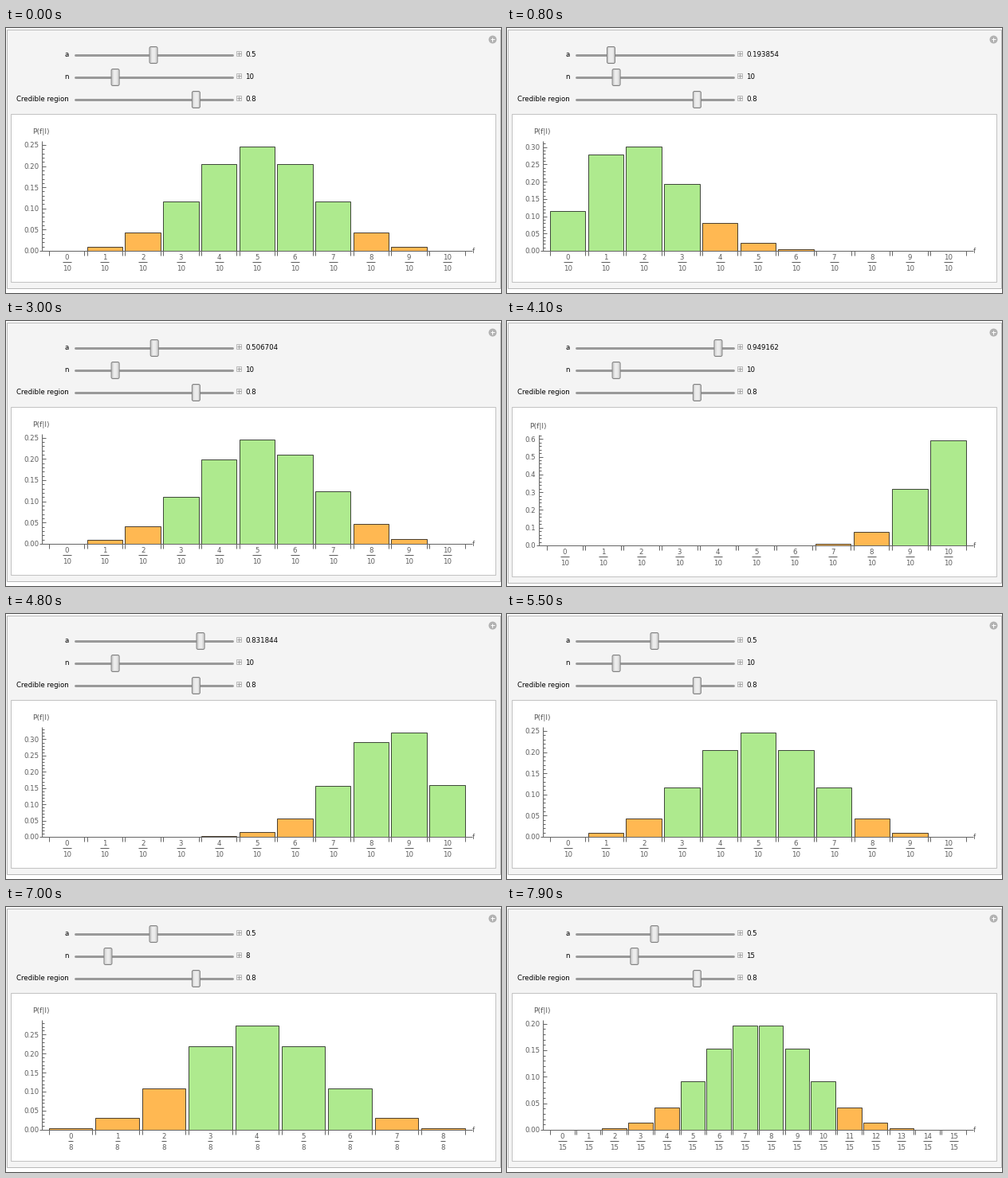
A matplotlib script that plays this animation: 621 px wide and 333 px high, repeating every 8 s.

```python
import math

import matplotlib.pyplot as plt
import numpy as np
from matplotlib.animation import FuncAnimation
from matplotlib.patches import Circle, FancyBboxPatch, Rectangle

W, H = 621, 333
STEP_MS, FRAMES = 100, 80
GREEN, ORANGE = "#aeea8e", "#ffb852"
EDGE = (0, 0, 0, 0.7)
AXIS, TEXT = "#666666", "#5c5c5c"
CREDIBLE = 0.8

# Slider drags as (time in ms, value)
A_KEYS = [(0, .5), (200, .465), (900, .15), (1000, .11), (1100, .11),
          (1300, .04), (1400, .05), (1600, .143575), (2100, .4), (2200, .4),
          (2600, .506704), (3100, .506704), (3800, .85), (4100, .949162),
          (4300, .988), (4400, .988), (4600, .94), (5300, .57), (5500, .5)]
N_KEYS = [(6000, 10), (6400, 3), (6500, 2), (6600, 3), (7200, 10),
          (7600, 10), (7900, 15)]

plt.rcParams["font.family"] = "DejaVu Sans"
plt.rcParams["lines.solid_capstyle"] = "butt"
fig = plt.figure(figsize=(W / 72, H / 72), dpi=72, facecolor="white")
ax = fig.add_axes([0, 0, 1, 1])


def value_at(keys, t):
    times, values = zip(*keys)
    return float(np.interp(t, times, values))


def slider_a(t):
    """Dragging moves the value in steps of one pixel of the track."""
    if t == 0 or t >= 5500:
        return 0.5
    anchor = 0.5067036 if t <= 3100 else 0.949162
    steps = round((value_at(A_KEYS, t) - anchor) * 179)
    return min(max(anchor + steps / 179, 0), 1)


# One-pixel strokes snap to pixel centres, so whole coordinates name pixels.
def line(x0, y0, x1, y1, color=AXIS, lw=1, **kw):
    ax.plot([x0, x1], [y0, y1], color=color, lw=lw, **kw)


def rect(x, y, w, h, face, edge, **kw):
    ax.add_patch(Rectangle((x, y), w, h, fc=face, ec=edge, lw=1, **kw))


def label(x, y, s, size=8.6, color=TEXT, ha="center"):
    ax.text(x, y, s, fontsize=size, color=color, ha=ha, va="baseline")


def draw_slider(y, name, pos, text):
    label(79, y + 2, name, 8.65, "black", "right")
    line(87, y, 284, y, "#999999", 3, solid_capstyle="round")
    x = 96 + 178 * pos
    ax.add_patch(FancyBboxPatch((x - 5, y - 10.5), 10, 21, fc="#cfcfcf",
                                ec="#828282", lw=1, zorder=3,
                                boxstyle="round,pad=0,rounding_size=2"))
    for half, shade in ((3.5, "#dcdcdc"), (2.2, "#ececec")):
        ax.add_patch(Rectangle((x - half, y - 9), 2 * half, 18, fc=shade,
                               lw=0, zorder=4))
    rect(289, y - 5, 6, 6, "#ececec", "#bcbcbc")
    line(290, y - 2, 295, y - 2, "#a4a4a4")
    line(292, y - 4, 292, y + 1, "#a4a4a4")
    label(300.3, y + 2, text, 8.65, "black", "left")


def credible_set(p):
    """Most probable outcomes, higher index first on ties."""
    chosen, mass = set(), 0
    for k in sorted(range(len(p)), key=lambda k: (-round(p[k], 9), -k)):
        if mass >= CREDIBLE:
            break
        chosen.add(k)
        mass += p[k]
    return chosen


def draw_chart(p, wide, step):
    n = len(p) - 1
    axis_x, left, base, height = ((45, 54, 280, 131) if wide
                                  else (40, 50, 282, 132.3))
    top, span = max(p), 575.6 - left
    scale = height / top
    gap = 0.0625 * span / n
    width = (span - n * gap) / (n + 1)
    green = credible_set(p)

    for k, prob in enumerate(p):
        x = left + k * (width + gap)
        if prob * scale > 0.6:
            rect(x, base - prob * scale, width, prob * scale,
                 GREEN if k in green else ORANGE, EDGE, zorder=2)
        for edge in (x, x + width):
            line(edge, base, edge, base + 6)
        mid = x + width / 2
        half = 5.5 if n >= 10 else 3
        label(mid, base + 11, str(k))
        line(mid - half, base + 14, mid + half, base + 14, TEXT)
        label(mid, base + 25, str(n))

    line(axis_x - 3, base, 585, base, zorder=3)
    label(586.7, base + 3, "f")
    line(axis_x, base, axis_x, base - 1.05 * height)
    label(axis_x - 1, base - 147, "P(f|I)", 9.3)

    parts = 4 if step == 0.2 else 5
    for i in range(int(1.05 * top / step * parts + 1e-6) + 1):
        value = i * step / parts
        y = base - value * scale
        major = i % parts == 0
        line(axis_x, y, axis_x + (5 if major else 3), y)
        if major:
            label(axis_x - 3.7, y + 3.4, f"{value:.{2 if wide else 1}f}",
                  ha="right")


def draw(frame):
    t = frame * STEP_MS
    a = slider_a(t)
    n = round(value_at(N_KEYS, t))
    p = [math.comb(n, k) * a**k * (1 - a)**(n - k) for k in range(n + 1)]
    step = 0.05 if max(p) < 0.373 else 0.1 if max(p) < 0.74 else 0.2
    wide = step == 0.05
    grow = 0 if wide else 2

    ax.clear()
    ax.set(xlim=(0, W), ylim=(H, 0))
    ax.axis("off")
    rect(1, 2, 619, 325 + grow, "#f4f4f4", "#b9b9b9", zorder=0)
    rect(6, 108, 608, 211 + grow, "white", "#c2c2c2", zorder=1)
    ax.add_patch(Circle((610.5, 14.5), 5, fc="#b2b2b2", lw=0))
    line(608, 14, 613, 14, "white")
    line(610, 12, 610, 17, "white")

    draw_slider(34, "a", a, f"{a:.6g}")
    draw_slider(62, "n", (n - 1) / 39, str(n))
    draw_slider(90, "Credible region", CREDIBLE, f"{CREDIBLE:g}")
    draw_chart(p, wide, step)
    return []


anim = FuncAnimation(fig, draw, frames=FRAMES, init_func=lambda: [],
                     interval=STEP_MS, repeat=True, repeat_delay=0)
plt.show()
```
